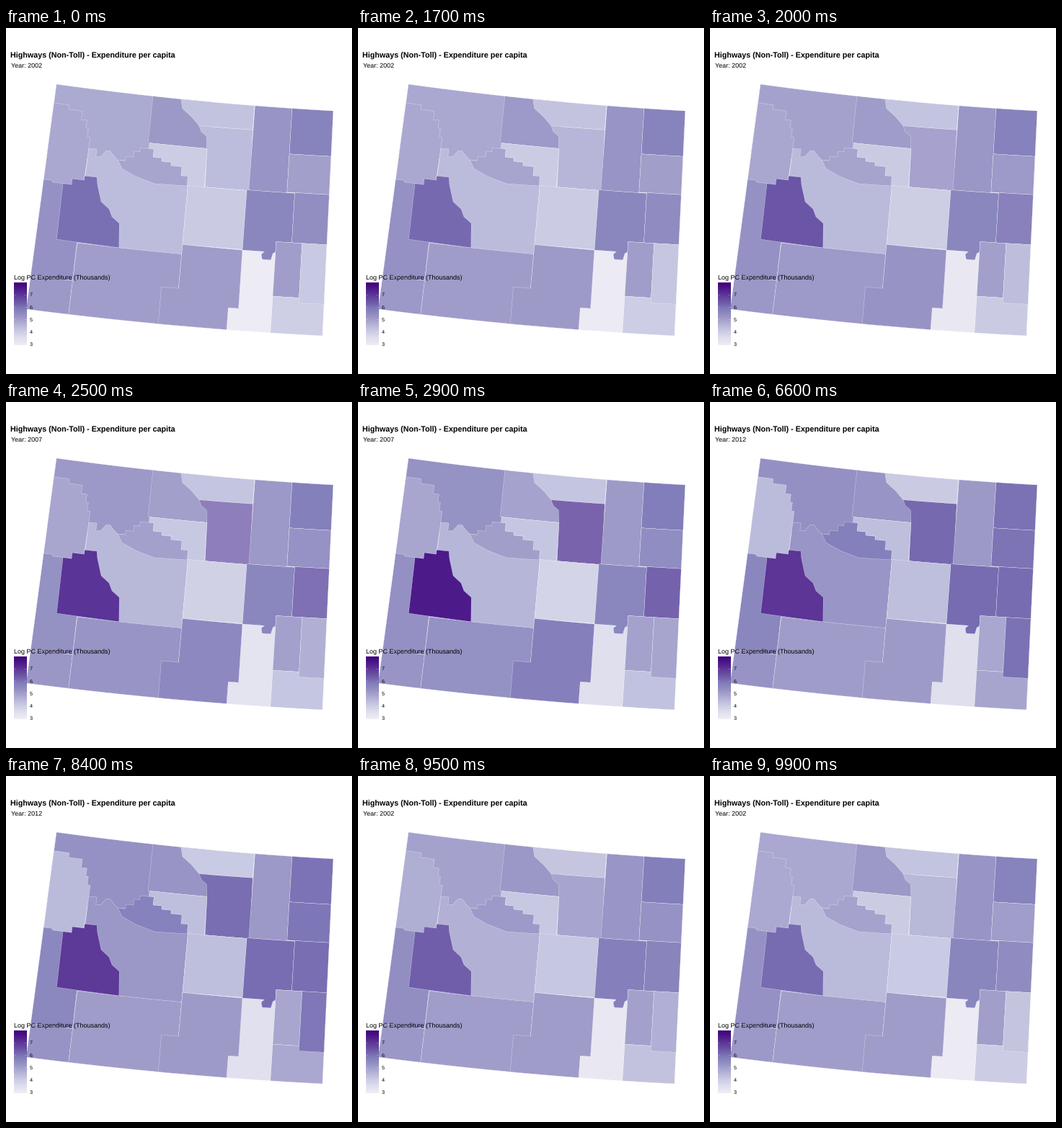
Animation of 480 by 480 pixels, one loop 10000 ms. Source, as a matplotlib script:

```python
import numpy as np
import matplotlib.pyplot as plt
from matplotlib.animation import FuncAnimation
from matplotlib.collections import PolyCollection
from matplotlib.colors import LinearSegmentedColormap

SIZE, DPI = 480, 96
PT = 72 / DPI
FRAMES, STEP = 100, 100
MOVE = 17                      # frames per transition
STARTS = (16, 49, 83)          # last still frame before each transition
LABEL_SWITCH = (25, 59, 92)
YEARS = (2002, 2007, 2012, 2002)
WIDE, TALL = 7, 4              # state extent in degrees

PURPLES = LinearSegmentedColormap.from_list("purples", [
    "#efedf5", "#dadaeb", "#bcbddc", "#9e9ac8",
    "#807dba", "#6a51a3", "#54278f", "#3f007d"])

plt.rcParams.update({"font.family": "Liberation Sans", "text.hinting": "none"})


def project(lon, lat):
    """Degrees east and south of the north-west corner to pixels."""
    t, s = lon / WIDE, lat / TALL
    x = 70 + 384 * t - (42 - 27 * t) * s
    y = 78 + 37 * t + 312 * s + 16 * t * (1 - t)
    return np.column_stack([x, y])


def outline(points, n=6):
    """Projected ring, its sides subdivided so they follow the curvature."""
    a = np.array(points, float)
    b = np.roll(a, -1, axis=0)
    k = np.arange(n)[:, None] / n
    ring = np.concatenate([p + (q - p) * k for p, q in zip(a, b)])
    return project(*ring.T)


def box(west, east, north, south):
    return [(west, north), (east, north), (east, south), (west, south)]


def stairs(start, *corners):
    """Path moving east, then north or south, to each corner in turn."""
    path = [start]
    for lon, lat in corners:
        path += [(lon, path[-1][1]), (lon, lat)]
    return path


# Irregular borders between neighbours
teton_north = stairs((0, .33), (.385, .41), (.73, .56), (.87, .7),
                     (.93, .85), (1, 1.047))
teton_south = stairs((0, 1.69), (.22, 1.72), (.69, 1.615), (.98, 1.54))
fremont_north = [(1, 1.047), (1.2, 1.044), (1.2, 1.185), (1.33, 1.16),
                 (1.42, 1.06), (1.52, 1.045), (1.66, 1.145), (1.74, 1.19)]
sublette_east = [(1.28, 1.535), (1.32, 1.67), (1.456, 1.957), (1.667, 2.07),
                 (1.757, 2.2), (1.95, 2.3), (2.01, 2.73)]
springs_north = stairs((1.74, 1.19), (1.93, 1.11), (2.12, 1.005),
                       (2.26, .93), (2.47, .927))
springs_east = stairs((2.47, .927), (2.6, 1.07), (2.82, 1.13), (3.06, 1.19),
                      (3.33, 1.35), (3.5, 1.52))
springs_south = [(2.7, 1.537), (2.23, 1.446), (1.87, 1.335)]
sheridan_west = [(3.15, 0), (3.21, .165), (3.45, .29), (3.665, .44)]
johnson_west = [(3.665, .44), (3.73, .54), (3.87, .61), (3.91, .83)]

# Later counties cover earlier ones; levels 0-7 for 2002, 2007 and 2012
COUNTIES = {
    "Park": (box(0, 2.5, 0, 1.2), (2.55, 3.55, 3.35)),
    "Teton": (teton_north + [(.98, 1.8), (0, 1.8)], (2.6, 2.7, 2.05)),
    "Fremont": (fremont_north + [(3.52, 1.19), (3.52, 2.735), (.98, 2.735)],
                (2, 2.25, 3.15)),
    "Lincoln": (teton_south + [(1, 3.4), (0, 3.4)], (3.3, 3.35, 3.65)),
    "Uinta": (box(0, 1, 3.4, 4), (3.05, 3.25, 3.25)),
    "Sweetwater": (box(1, 3.52, 2.73, 4), (2.9, 3.45, 2.95)),
    "Sublette": ([(.48, 1.72)] + teton_south[3:] + sublette_east
                 + [(.5, 2.71)], (4.3, 7, 5.65)),
    "Big Horn": (box(2.44, 3.91, 0, .83), (3.05, 2.7, 3.2)),
    "Washakie": (springs_east + [(3.93, 1.52), (3.91, .83), (2.48, .83)],
                 (1.5, 1.75, 1.95)),
    "Hot Springs": (springs_north + springs_east + springs_south,
                    (2.7, 2.95, 3.9)),
    "Sheridan": (sheridan_west + [(5.01, .43), (5.01, 0)], (1.8, 1.7, 1.55)),
    "Johnson": (johnson_west + [(3.94, 1.51), (5.04, 1.51), (5.01, .43)],
                (2, 5.2, 4.45)),
    "Campbell": (box(5.02, 5.96, 0, 1.5), (3.2, 2.95, 3.05)),
    "Crook": (box(5.96, 7, 0, .81), (3.75, 4, 4.25)),
    "Weston": (box(5.96, 7, .81, 1.49), (2.85, 3.65, 4.2)),
    "Natrona": (box(3.52, 4.97, 1.51, 2.56), (1.55, 1.1, 1.95)),
    "Albany": (box(4.73, 5.77, 2.57, 4), (.1, .95, .75)),
    "Carbon": ([(3.52, 2.56), (4.97, 2.57), (4.98, 3.61), (4.735, 3.61),
                (4.735, 4), (3.12, 4), (3.11, 3.34), (3.52, 3.34)],
               (2.95, 4.15, 3)),
    "Converse": (box(4.97, 6.15, 1.5, 2.38)[:3]
                 + [(5.77, 2.38), (5.77, 2.57), (5.71, 2.59), (5.67, 2.71),
                    (5.46, 2.71), (5.43, 2.62), (5.5, 2.57), (4.97, 2.57)],
                 (3.65, 3.65, 4.4)),
    "Niobrara": (box(6.15, 7, 1.49, 2.38), (3.4, 4.9, 4.4)),
    "Platte": (box(5.77, 6.4, 2.38, 3.35), (2.9, 2.75, 2.65)),
    "Laramie": (box(5.77, 7, 3.35, 4), (1.4, 1.95, 2.7)),
    "Goshen": (box(6.4, 7, 2.38, 3.44), (1.6, 3.05, 4.25)),
}

shapes, levels = zip(*COUNTIES.values())
fill = [PURPLES(np.array(level) / 7) for level in zip(*levels)]
fill.append(fill[0])

fig = plt.figure(figsize=(SIZE / DPI, SIZE / DPI), dpi=DPI, facecolor="white")
ax = fig.add_axes([0, 0, 1, 1])
ax.axis("off")

counties = PolyCollection([outline(s) for s in shapes], facecolors=fill[0],
                          edgecolors="white", linewidths=0.25 * PT, zorder=1)
ax.add_collection(counties)


def label(x, y, text, px, **kw):
    return ax.text(x, y, text, fontsize=px * PT, va="baseline", zorder=5, **kw)


label(6.2, 42, "Highways (Non-Toll) - Expenditure per capita", 10.8,
      weight="bold")
year = label(6.6, 55, "", 9)

# Legend
LEFT, RIGHT, TOP, BOTTOM = 11, 28.3, 353.5, 440
label(LEFT, 349, "Log PC Expenditure (Thousands)", 9)
ax.imshow(np.linspace(1, 0, 256)[:, None], cmap=PURPLES, aspect="auto",
          extent=(LEFT, RIGHT, BOTTOM, TOP), zorder=3)
for value in range(3, 8):
    y = 438.6 - 17.25 * (value - 3)
    for x in (LEFT, RIGHT - 3.4):
        ax.plot([x, x + 3.4], [y, y], color="white", alpha=0.4,
                lw=0.5 * PT, solid_capstyle="butt", zorder=4)
    label(32.7, y + 2.6, str(value), 7.2)

ax.set_xlim(0, SIZE)
ax.set_ylim(SIZE, 0)


def draw(frame):
    colors = fill[0].copy()
    for i, start in enumerate(STARTS):
        p = np.clip((frame - start) / MOVE, 0, 1)
        colors += p * (fill[i + 1] - fill[i])
    counties.set_facecolor(np.clip(colors, 0, 1))
    year.set_text(f"Year: {YEARS[sum(frame >= s for s in LABEL_SWITCH)]}")
    return counties, year


anim = FuncAnimation(fig, draw, frames=FRAMES, interval=STEP, repeat=True,
                     repeat_delay=0)
plt.show()
```
